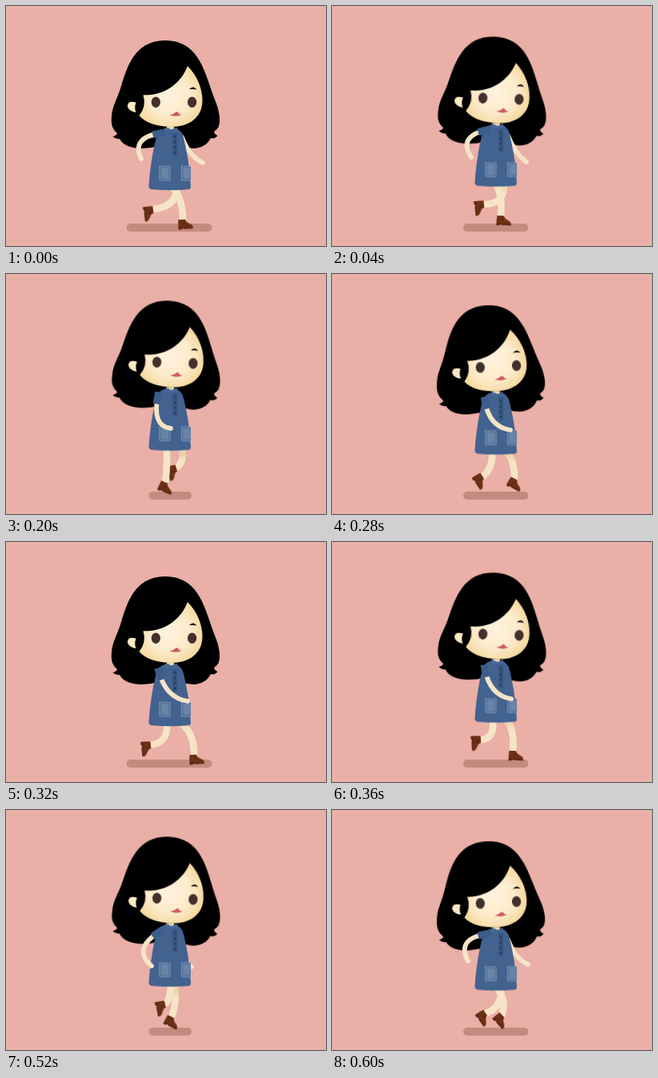
These frames come from a looping animation (400 px wide and 300 px high, 640 ms). An HTML page without scripts:

```html
<!DOCTYPE html>
<html lang="en">
<head>
<meta charset="utf-8">
<title>Walking girl</title>
<style>
html, body { margin: 0; width: 100%; height: 100%; overflow: hidden; background: #eaafa7; }
svg { display: block; width: 100vw; height: 100vh; }

/* One stride is 640 ms, each of its two steps 320 ms, drawn at 25 fps. */
.bob { animation: bob 320ms step-end infinite; }
.nod { animation: nod 320ms step-end infinite; transform-origin: 207px 158px; }
.shadow { fill: #c48a80; animation: shadow 320ms step-end infinite; }
.limb { fill: none; stroke: #f6e4c6; stroke-linecap: round; }
.leg { stroke-width: 8.6; stroke-linecap: butt; }
.arm { stroke-width: 5.8; }
.sleeve { fill: none; stroke: #3c5c8b; stroke-width: 9; stroke-linecap: square; stroke-dasharray: 6 199; }
.near-leg { animation: near-leg 640ms steps(2) infinite; }
.far-leg { stroke: url(#thigh); animation: far-leg 640ms steps(2) infinite; }
.near-boot { animation: near-boot 640ms steps(2) infinite; }
.far-boot { animation: far-boot 640ms steps(2) infinite; }
.near-arm { animation: near-arm 640ms steps(2) infinite; }
.far-arm { animation: far-arm 640ms steps(2) infinite; }

@keyframes bob {
  0%, 100% { transform: translateY(0); }
  12.5%, 87.5% { transform: translateY(-4.5px); }
  25%, 75% { transform: translateY(-7.6px); }
  37.5%, 62.5% { transform: translateY(-9.4px); }
  50% { transform: translateY(-10px); }
}
@keyframes nod {
  0%, 100% { transform: rotate(0deg); }
  12.5% { transform: rotate(2deg); }
  25% { transform: rotate(2.9deg); }
  37.5% { transform: rotate(3.1deg); }
  50% { transform: rotate(2.8deg); }
  62.5% { transform: rotate(2deg); }
  75% { transform: rotate(-.8deg); }
  87.5% { transform: rotate(-3deg); }
}
@keyframes shadow {
  0%, 100% { x: 150.5px; width: 107px; }
  12.5%, 87.5% { x: 164px; width: 81.5px; }
  25%, 75% { x: 173px; width: 64px; }
  37.5%, 62.5% { x: 178.5px; width: 53.5px; }
  50% { x: 180px; width: 50px; }
}
@keyframes near-leg {
  0% { d: path("M205 224Q221 236 221 268"); animation-timing-function: step-end; }
  6.25% { d: path("M204 219Q214 238 211 264"); }
  18.75% { d: path("M201 214Q202 238 202 263"); }
  31.25% { d: path("M201 214Q202 238 199 261"); }
  43.75% { d: path("M200 219Q202 244 187 254"); animation-timing-function: step-end; }
  50% { d: path("M201 224Q204 252 179 254"); animation-timing-function: step-end; }
  56.25% { d: path("M201 219Q204 248 185 247"); }
  68.75% { d: path("M204 214Q211 243 191 244"); }
  81.25% { d: path("M206 214Q206 242 197 242"); }
  93.75% { d: path("M202 219Q220 234 212 258"); animation-timing-function: step-end; }
  100% { d: path("M205 224Q221 236 221 268"); }
}
@keyframes near-boot {
  0% { transform: translate(220px, 268px) rotate(-3deg); animation-timing-function: step-end; }
  6.25% { transform: translate(211px, 263px) rotate(3deg); }
  18.75% { transform: translate(202px, 262.5px) rotate(16deg); }
  31.25% { transform: translate(198px, 261px) rotate(23deg); }
  43.75% { transform: translate(187px, 253px) rotate(57deg); animation-timing-function: step-end; }
  50% { transform: translate(180px, 254px) rotate(85deg); animation-timing-function: step-end; }
  56.25% { transform: translate(185px, 247px) rotate(86deg); }
  68.75% { transform: translate(191px, 244px) rotate(84deg); }
  81.25% { transform: translate(198px, 243px) rotate(78deg); }
  93.75% { transform: translate(212px, 257px) rotate(48deg); animation-timing-function: step-end; }
  100% { transform: translate(220px, 268px) rotate(-3deg); }
}
@keyframes far-leg {
  0% { d: path("M214 224Q214 252 183 254"); animation-timing-function: step-end; }
  6.25% { d: path("M215 219Q218 248 189 248"); }
  18.75% { d: path("M217 214Q223 244 205 242"); }
  31.25% { d: path("M219 214Q225 236 211 243"); }
  43.75% { d: path("M216 219Q229 233 228 257"); animation-timing-function: step-end; }
  50% { d: path("M216 224Q236 238 235 267"); animation-timing-function: step-end; }
  56.25% { d: path("M217 219Q229 236 226 263"); }
  68.75% { d: path("M213 214Q215 238 211 264"); }
  81.25% { d: path("M210 214Q215 238 207 259"); }
  93.75% { d: path("M211 219Q215 246 191 255"); animation-timing-function: step-end; }
  100% { d: path("M214 224Q214 252 183 254"); }
}
@keyframes far-boot {
  0% { transform: translate(183px, 255px) rotate(83deg); animation-timing-function: step-end; }
  6.25% { transform: translate(189px, 248px) rotate(84deg); }
  18.75% { transform: translate(205px, 242px) rotate(75deg); }
  31.25% { transform: translate(212px, 243px) rotate(73deg); }
  43.75% { transform: translate(227.5px, 256.5px) rotate(28deg); animation-timing-function: step-end; }
  50% { transform: translate(234px, 267px) rotate(-3deg); animation-timing-function: step-end; }
  56.25% { transform: translate(226px, 262px) rotate(2deg); }
  68.75% { transform: translate(211px, 263px) rotate(14deg); }
  81.25% { transform: translate(206px, 259px) rotate(27deg); }
  93.75% { transform: translate(191px, 254px) rotate(56deg); animation-timing-function: step-end; }
  100% { transform: translate(183px, 255px) rotate(83deg); }
}
@keyframes near-arm {
  0% { d: path("M194 159Q156 164 169 191"); animation-timing-function: step-end; }
  6.25% { d: path("M193 155Q157 163 174 189"); }
  18.75% { d: path("M192 152Q155 172 182 190"); }
  31.25% { d: path("M190 152Q182 190 206 193"); }
  43.75% { d: path("M191 158Q196 191 223 195"); animation-timing-function: step-end; }
  50% { d: path("M191 162Q200 195 227 199"); animation-timing-function: step-end; }
  56.25% { d: path("M191 158Q197 192 224 196"); }
  68.75% { d: path("M190 152Q180 190 204 194"); }
  81.25% { d: path("M192 152Q157 174 182 195"); }
  93.75% { d: path("M193 155Q155 161 170 189"); animation-timing-function: step-end; }
  100% { d: path("M194 159Q156 164 169 191"); }
}
@keyframes far-arm {
  0% { d: path("M220 164Q229 188 246 196"); animation-timing-function: step-end; }
  6.25% { d: path("M220 162Q229 185 243 195"); }
  18.75% { d: path("M214 164Q221 188 232 196"); }
  31.25% { d: path("M212 162Q215 184 221 193"); }
  43.75% { d: path("M212 162Q212 184 215 193"); animation-timing-function: step-end; }
  50% { d: path("M212 164Q212 186 215 195"); animation-timing-function: step-end; }
  56.25% { d: path("M212 162Q212 184 215 193"); }
  68.75% { d: path("M212 162Q215 184 221 193"); }
  81.25% { d: path("M214 164Q221 188 232 196"); }
  93.75% { d: path("M220 162Q229 186 245 193"); animation-timing-function: step-end; }
  100% { d: path("M220 164Q229 188 246 196"); }
}
</style>
</head>
<body>
<svg viewBox="0 0 400 300" preserveAspectRatio="none">
  <defs>
    <radialGradient id="skin" gradientUnits="userSpaceOnUse" cx="203" cy="112" r="50">
      <stop offset="0" stop-color="#fff3e0"/>
      <stop offset=".5" stop-color="#fcebcc"/>
      <stop offset="1" stop-color="#f3d28d"/>
    </radialGradient>
    <linearGradient id="thigh" gradientUnits="userSpaceOnUse" x1="0" y1="226" x2="0" y2="235">
      <stop offset="0" stop-color="#e8d5aa"/>
      <stop offset="1" stop-color="#f6e4c6"/>
    </linearGradient>
    <clipPath id="cut"><path d="M170 190H231V240H170Z"/></clipPath>
    <g id="boot">
      <path fill="#6c3015" d="M-4.500-1H4C5 3 8 3.500 11 5.500Q14 7.500 13.300 10.500H2L0 9.500L-1 11.500H-5Q-5.500 5-4.500-1Z"/>
      <path fill="none" stroke="#471b0b" d="M-5 10L0 9L2 10H13M4 2L1 5"/>
    </g>
    <g id="pocket" fill="#56739c" stroke="#9dafc6" stroke-width=".8">
      <path stroke-dasharray="2 1" d="M191.800 200.300H205.200V218H191.800Z"/>
      <path fill="#6b83a6" stroke="none" d="M194 202.500H203V215.500H194Z"/>
    </g>
  </defs>

  <rect class="shadow" x="150.5" y="272" width="107" height="10" rx="5"/>

  <g class="bob">
    <g class="nod">
      <path d="M199 43C238 43 247 78 255 100C260 117 266 125 267 140Q268 153 260 157Q261 161 264.500 162Q261 166.500 256 165C252 173 244 178 234 178Q216 177 207 166Q192 178 170 178C156 178 146 174 142 166Q137 167 133.500 163Q138 162 139 159C133 154 131 148 132 138C133 124 139 117 144 100C151 78 160 43 199 43Z"/>
      <path fill="url(#skin)" d="M227 75C239 87 245.500 103 245.500 118C245.500 140 228 151 207 151C190 151 174 146 166.500 137Q176 125 171.500 111.300C198 112 218 98 227 75Z"/>
      <path fill="#fbe8c4" d="M162.500 120.500Q152.500 117.500 151.800 125Q153 131.500 162.500 133Q160 127 162.500 120.500Z"/>
      <g fill="#43302c">
        <ellipse cx="187.300" cy="120.300" rx="5.600" ry="6.700"/>
        <ellipse cx="232.600" cy="120.300" rx="5.600" ry="6.700"/>
      </g>
      <path d="M229 104.300Q234 98.800 238.300 104.600Q233.500 103 229 104.300Z"/>
      <path fill="#cb5d63" d="M204.300 136Q210 135 213.500 132Q216 133 216.500 135L219.800 136Q212 139.300 204.300 136Z"/>
    </g>
  </g>

  <path class="limb arm far-arm" d="M220 164Q229 188 246 196"/>
  <path class="limb leg far-leg" d="M214 224Q214 252 183 254"/>
  <use class="far-boot" href="#boot"/>
  <path class="limb leg near-leg" d="M205 224Q221 236 221 268"/>
  <use class="near-boot" href="#boot"/>

  <g class="bob">
    <path fill="#ead6aa" d="M201 150.500H210V157H201Z"/>
    <path fill="#42628f" d="M198 153.500Q191 155 188.500 162Q184 178 181 200Q179 215 178.500 226Q179 229 183 229.300Q204 231 228 229.300Q231 229 231 226Q230 207 227.500 192Q224.500 174 221 161Q218 155 213 153.500Q205 157 198 153.500Z"/>
    <path fill="#456697" d="M197.500 154L200 151.500L207 154.500L213 151.500L215 155L210 160L206 156.500L201 159Z"/>
    <path fill="#38557f" d="M208 158.500H214V186Q211 189 208.500 186Z"/>
    <path fill="none" stroke="#1f355c" stroke-width="2.400" stroke-linecap="round" stroke-dasharray="0 6.500" d="M211 163.500V184"/>
    <g clip-path="url(#cut)">
      <use href="#pocket"/>
      <use href="#pocket" x="27.600"/>
    </g>
  </g>

  <path class="limb arm near-arm" d="M194 159Q156 164 169 191"/>
  <path class="sleeve near-arm" d="M194 159Q156 164 169 191"/>
</svg>
</body>
</html>
```
